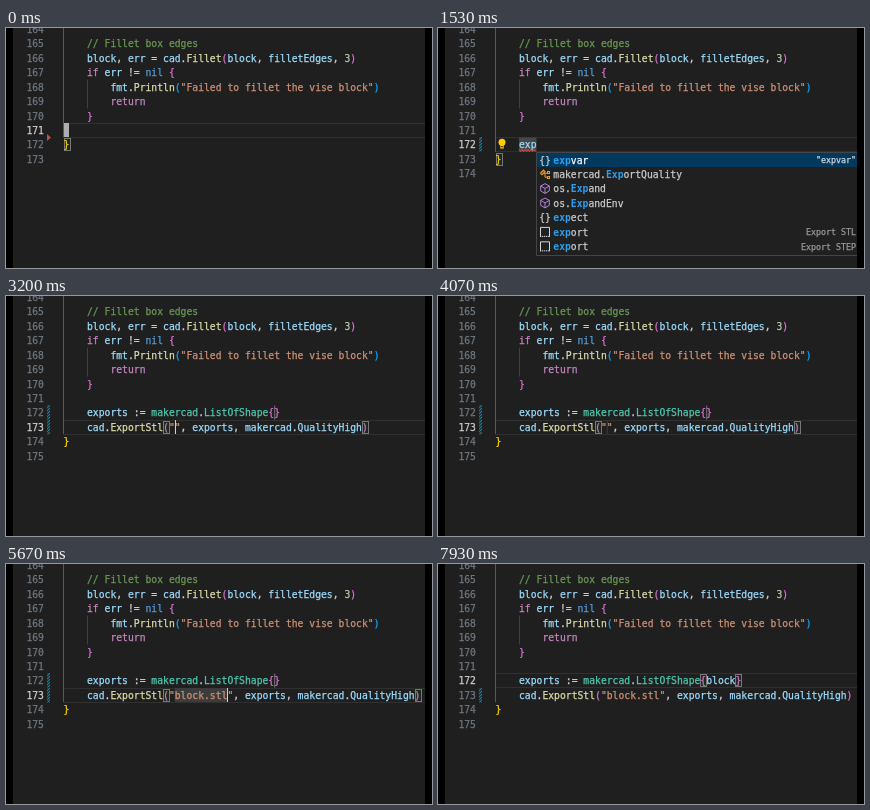
Animation of 426 by 240 pixels, one loop 8 s. Source, as an HTML page with a canvas:

```html
<!DOCTYPE html>
<html lang="en">
<head>
<meta charset="utf-8">
<title>Code editor</title>
<style>
  html, body { margin: 0; width: 100%; height: 100%; overflow: hidden; background: #000; }
  canvas { display: block; width: 426px; height: 240px; }
</style>
</head>
<body>
<canvas width="426" height="240"></canvas>
<script>
const ctx = document.querySelector('canvas').getContext('2d');
const LOOP = 8000;
const CW = 5.85, LH = 14.44, LEFT = 57.6, RIGHT = 419;
const FONT = '"DejaVu Sans Mono", monospace';

const COLORS = {
  comment: '#6a9955', string: '#ce9178', control: '#c586c0', constant: '#569cd6',
  call: '#dcdcaa', type: '#4ec9b0', name: '#9cdcfe', number: '#b5cea8', plain: '#d4d4d4'
};
const BRACKETS = ['#ffd700', '#da70d6', '#179fff'];

const HEAD = [
  '',
  '    // Fillet box edges',
  '    block, err = cad.Fillet(block, filletEdges, 3)',
  '    if err != nil {',
  '        fmt.Println("Failed to fillet the vise block")',
  '        return',
  '    }',
  ''
];
const FIRST_LINE = 164;

// Moments of the edit, in ms
const NEW_LINE = 500, ACCEPT = 3140, JUMP = 6130;
const keyTimes = (start, step, count) => Array.from({ length: count }, (_, i) => start + i * step);
const WORD_KEYS = keyTimes(800, 100, 3);
const MOVE_KEYS = keyTimes(1800, 132, 5);
const FILE_KEYS = keyTimes(4500, 130, 9);
const SHAPE_KEYS = [6600, ...keyTimes(6800, 150, 4)];
const ALL_KEYS = [0, NEW_LINE, ...WORD_KEYS, ...MOVE_KEYS, ACCEPT, ...FILE_KEYS, JUMP, ...SHAPE_KEYS];
const pressed = (keys, t) => keys.filter(k => k <= t).length;

const SUGGESTIONS = [
  { icon: 'module', label: 'expvar', detail: '"expvar"', lazy: true },
  { icon: 'class', label: 'makercad.ExportQuality' },
  { icon: 'cube', label: 'os.Expand' },
  { icon: 'cube', label: 'os.ExpandEnv' },
  { icon: 'module', label: 'expect' },
  { icon: 'snippet', label: 'export', detail: 'Export STL' },
  { icon: 'snippet', label: 'export', detail: 'Export STEP' }
];

const lineY = n => 15.5 + (n - 165) * LH;
const colX = col => LEFT + col * CW;

function rect(x, y, w, h, color) {
  ctx.fillStyle = color;
  ctx.fillRect(x, y, w, h);
}

function outline(x, y, w, h, color) {
  ctx.strokeStyle = color;
  ctx.lineWidth = 1;
  ctx.strokeRect(Math.round(x) + .5, Math.round(y) + .5, Math.round(w) - 1, Math.round(h) - 1);
}

function path(points, color, width = 1) {
  ctx.beginPath();
  points.forEach(([x, y]) => ctx.lineTo(x, y));
  ctx.strokeStyle = color;
  ctx.lineWidth = width;
  ctx.stroke();
}

// Monospaced text on the character grid, slightly thickened
function text(str, x, y, color, { advance = CW, weight = 'normal' } = {}) {
  ctx.font = `${weight} ${advance / .602}px ${FONT}`;
  ctx.fillStyle = ctx.strokeStyle = color;
  ctx.lineWidth = .25;
  [...str].forEach((ch, i) => {
    ctx.fillText(ch, x + i * advance, y + 3.8);
    if (weight === 'normal') ctx.strokeText(ch, x + i * advance, y + 3.8);
  });
}

function tokenColor(token, rest) {
  if (token.startsWith('//')) return COLORS.comment;
  if (token[0] === '"') return COLORS.string;
  if (/^(if|return)$/.test(token)) return COLORS.control;
  if (token === 'nil') return COLORS.constant;
  if (token === 'ListOfShape' || rest.startsWith('.ListOfShape')) return COLORS.type;
  if (/^\d/.test(token)) return COLORS.number;
  if (/^\w/.test(token)) return rest[0] === '(' ? COLORS.call : COLORS.name;
  return COLORS.plain;
}

function drawCode(lines) {
  let depth = 1;
  lines.forEach((line, i) => {
    for (const m of line.matchAll(/\/\/.*|"[^"]*"|\w+|[^\s]/g)) {
      const token = m[0];
      let color;
      if ('({'.includes(token)) color = BRACKETS[depth++ % 3];
      else if (')}'.includes(token)) color = BRACKETS[--depth % 3];
      else color = tokenColor(token, line.slice(m.index + token.length));
      text(token, colX(m.index), lineY(FIRST_LINE + i), color);
    }
  });
}

function bracketBox(line, col) {
  const x = colX(col), y = lineY(line) - 6.5;
  rect(x, y, CW, 13, '#1d2b1d');
  outline(x, y, CW + 1, 13, '#777');
}

function gutterHatch(line) {
  const top = Math.round(lineY(line) - LH / 2);
  ctx.save();
  ctx.beginPath();
  ctx.rect(41, top, 3, LH);
  ctx.clip();
  for (let y = top - 3; y < top + 18; y += 3) path([[40, y + 4], [45, y - 1]], '#1b81a8', 1.2);
  ctx.restore();
}

function lightbulb(x, y) {
  ctx.fillStyle = '#ffcc00';
  ctx.beginPath();
  ctx.arc(x, y - 1.8, 3.5, 0, 7);
  ctx.fill();
  rect(x - 1.7, y + 1, 3.4, 3.6, '#ffcc00');
  rect(x - 1, y + 2.2, 2, 1, '#1f1f1f');
}

const ICONS = {
  module: (x, y) => text('{}', x - 5.8, y, '#cccccc'),
  class(x, y) {
    const c = '#ee9d28';
    path([[x - 4.5, y - 1], [x - 1.5, y - 4], [x, y - 2.5], [x - 3, y + .5], [x - 4.5, y - 1]], c, 1.2);
    path([[x - 1.5, y - 1], [x + 3, y - 1]], c);
    path([[x, y - 1], [x, y + 3], [x + 3, y + 3]], c);
    outline(x + 2, y - 3, 3, 3, c);
    outline(x + 2, y + 2, 3, 3, c);
  },
  cube(x, y) {
    const c = '#b180d7';
    path([[x, y - 5], [x + 4.3, y - 2.7], [x + 4.3, y + 2.3], [x, y + 4.8],
      [x - 4.3, y + 2.3], [x - 4.3, y - 2.7], [x, y - 5]], c);
    path([[x - 4.3, y - 2.7], [x, y - .2], [x + 4.3, y - 2.7]], c);
    path([[x, y - .2], [x, y + 4.8]], c);
  },
  snippet(x, y) {
    const c = '#d4d4d4';
    path([[x - 4.5, y + 5], [x - 4.5, y - 4.5], [x + 4.5, y - 4.5], [x + 4.5, y + 5]], c);
    for (let dx = -5; dx <= 4; dx += 2) rect(x + dx, y + 4, 1.3, 1, c);
  }
};

function drawPopup(selected) {
  const x = 98, top = 124;
  rect(x, top, RIGHT - x, 104, '#202020');
  SUGGESTIONS.forEach(({ icon, label, detail, lazy }, i) => {
    const y = 131.8 + i * 14.42, active = i === selected;
    if (active) rect(x + 1, y - 7.2, RIGHT - x - 1, 14.4, '#04395e');
    ICONS[icon](107, y);
    const at = label.search(/exp/i), color = active ? '#fff' : '#ccc';
    const part = (from, to, c, weight) =>
      text(label.slice(from, to), 115.3 + from * CW, y, c, { weight });
    part(0, at, color);
    part(at, at + 3, '#2a9ff0', 'bold');
    part(at + 3, label.length, color);
    if (detail && (active || !lazy)) {
      const advance = 5;
      text(detail, 418 - detail.length * advance, y - .4, active ? '#d0d8de' : '#999', { advance });
    }
  });
  path([[RIGHT, top + .5], [x + .5, top + .5], [x + .5, top + 103.5], [RIGHT, top + 103.5]], '#454545');
}

function squiggle(x, y, width) {
  const points = Array.from({ length: Math.floor(width / 1.5) + 1 }, (_, i) => [x + i * 1.5, y + (i % 2 ? 1 : -1)]);
  path(points, '#f14c4c', .9);
}

function editorState(t) {
  const word = 'exp'.slice(0, pressed(WORD_KEYS, t));
  const file = 'block.stl'.slice(0, pressed(FILE_KEYS, t));
  const shape = 'block'.slice(0, pressed(SHAPE_KEYS, t));
  if (t < NEW_LINE) return { body: [], line: 171, col: 0, file, shape, word };
  if (t < ACCEPT) return { body: ['    ' + word], line: 172, col: 4 + word.length, file, shape, word };
  const body = [
    `    exports := makercad.ListOfShape{${shape}}`,
    `    cad.ExportStl("${file}", exports, makercad.QualityHigh)`
  ];
  return t < JUMP
    ? { body, line: 173, col: 19 + file.length, file, shape, word }
    : { body, line: 172, col: 36 + shape.length, file, shape, word };
}

function draw(t) {
  const { body, line, col, file, shape, word } = editorState(t);
  const lines = [...HEAD, ...body, '}'];
  const closing = FIRST_LINE + lines.length - 1;
  const normal = t < NEW_LINE, snippet = t >= ACCEPT;
  const popup = t >= WORD_KEYS[2] && !snippet;
  const y = lineY(line);
  const sinceKey = t - Math.max(...ALL_KEYS.filter(k => k <= t));
  const cursorOn = sinceKey % 1000 < 500;

  rect(0, 0, 426, 240, '#000');
  ctx.save();
  ctx.beginPath();
  ctx.rect(7, 0, RIGHT - 7, 240);
  ctx.clip();
  rect(7, 0, RIGHT - 7, 240, '#1f1f1f');

  rect(58, Math.round(y - 7.5), RIGHT - 58, 1, '#303030');
  rect(58, Math.round(y + 6.5), RIGHT - 58, 1, '#303030');
  rect(57, 0, 1, lineY(closing) - LH / 2, '#585858');
  rect(81, lineY(168) - LH / 2, 1, LH * 2, '#404040');

  if (!snippet) bracketBox(closing, 0);
  if (popup) rect(colX(4), y - 7, CW * 3, 14, '#484848');
  if (snippet && line === 173) {
    rect(colX(19), y - 7, Math.max(1, file.length * CW), 14, '#3c3c3c');
    rect(colX(36), lineY(172) - 7, 1, 14, '#777');
    bracketBox(173, 17);
    bracketBox(173, body[1].length - 1);
  }
  if (snippet && line === 172) {
    bracketBox(172, 35);
    bracketBox(172, 36 + shape.length);
  }

  for (let n = FIRST_LINE; n <= closing + 1; n++)
    text(String(n), 20.4, lineY(n), n === line ? '#cccccc' : '#6e7681');
  drawCode(lines);

  if (normal) {
    ctx.fillStyle = '#c74e39';
    ctx.beginPath();
    ctx.moveTo(41, 106);
    ctx.lineTo(45, 109.5);
    ctx.lineTo(41, 113);
    ctx.fill();
  } else {
    if (t < SHAPE_KEYS[4]) gutterHatch(172);
    if (snippet) gutterHatch(173);
  }
  if (word && !snippet) squiggle(colX(4), y + 6, word.length * CW);
  if (popup) lightbulb(64, 116);
  if (cursorOn) rect(Math.round(colX(col)), Math.round(y - 7), normal ? 5 : 1, 14, normal ? '#aeafad' : '#d0d0d0');
  if (popup) drawPopup(pressed(MOVE_KEYS, t));
  ctx.restore();
}

function tick() {
  draw(performance.now() % LOOP);
  requestAnimationFrame(tick);
}
tick();
</script>
</body>
</html>
```
